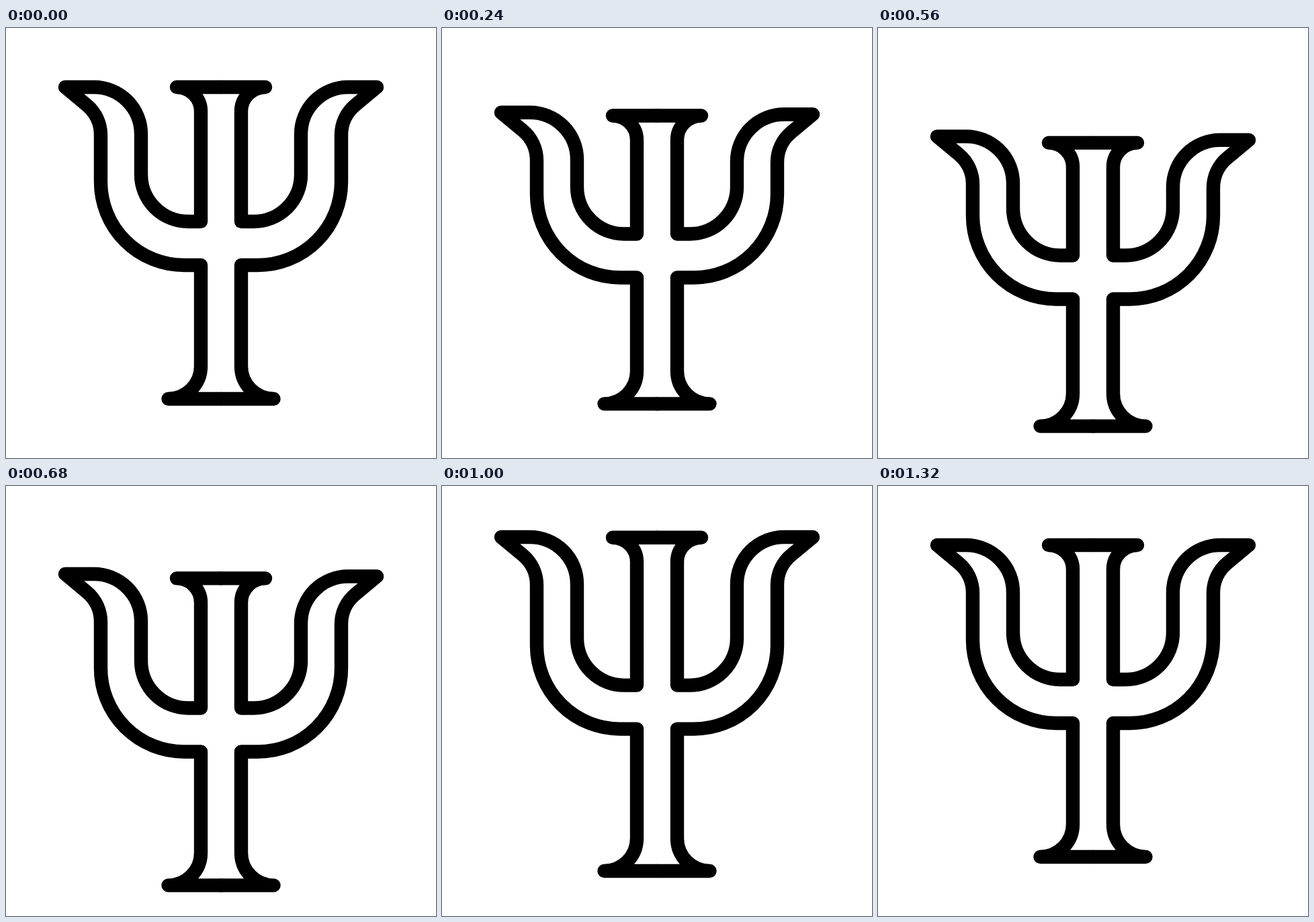
Recreate the animation shown at these times as an HTML page with a canvas. Size 640 by 640 pixels, loop 1.4 s.

```html
<!DOCTYPE html>
<html lang="en">
<head>
<meta charset="utf-8">
<title>Bouncing psi</title>
<style>
  html, body { margin: 0; width: 100%; height: 100%; overflow: hidden; background: #fff; }
  canvas { display: block; width: 640px; height: 640px; }
</style>
</head>
<body>
<canvas id="stage" width="640" height="640"></canvas>
<script>
const ctx = document.getElementById('stage').getContext('2d');
const LOOP = 1400, STEP = 40;

// Ease-in-out, cubic-bezier(.42, 0, .58, 1), between two times.
function ease(t, from, to) {
  const x = Math.min(1, Math.max(0, (t - from) / (to - from)));
  let u = x;
  for (let i = 0; i < 5; i++) {
    const error = ((0.52 * u - 0.78) * u + 1.26) * u - x;
    u -= error / ((1.56 * u - 1.56) * u + 1.26);
  }
  return u * u * (3 - 2 * u);
}

// Tips drop, spring past their rest height and settle.
function tipOffset(t, drop, lift) {
  return drop * ease(t, 77, 430)
    - (drop + lift) * ease(t, 412, 985)
    + lift * ease(t, 985, 1303);
}

const crossOffset = t => 53 * (ease(t, 71, 483) - ease(t, 440, 1217));
const baseOffset = t => 42.4 * (ease(t, 77, 642) - ease(t, 699, 1298));

// Left half of the outline, from the top bar round to the base.
function drawHalf(tip, top, cross, base) {
  ctx.beginPath();
  ctx.moveTo(320, 88 + top);
  ctx.lineTo(254, 88 + top);
  ctx.arcTo(290, 88 + top, 290, 124 + top, 36);
  ctx.lineTo(290, 288 + cross);
  ctx.arcTo(201, 288 + cross, 201, 218 + cross, 70);
  ctx.arcTo(201, 88 + tip, 131, 88 + tip, 70);
  ctx.lineTo(88, 88 + tip);
  ctx.arcTo(141, 132 + tip, 141, 159 + tip, 58);
  ctx.arcTo(141, 353 + cross, 265, 353 + cross, 124);
  ctx.lineTo(290, 353 + cross);
  ctx.arcTo(290, 552 + base, 241.5, 552 + base, 48.5);
  ctx.lineTo(241.5, 552 + base);
  ctx.lineTo(320, 552 + base);
  ctx.stroke();
}

function draw(t) {
  const top = tipOffset(t, 98, 11.3);
  const cross = crossOffset(t);
  const base = baseOffset(t);

  ctx.fillStyle = '#fff';
  ctx.fillRect(0, 0, 640, 640);
  ctx.strokeStyle = '#000';
  ctx.lineWidth = 20.4;
  ctx.lineCap = ctx.lineJoin = 'round';

  drawHalf(tipOffset(t, 87, 12), top, cross, base);
  ctx.save();
  ctx.translate(640, 0);
  ctx.scale(-1, 1);
  drawHalf(tipOffset(t, 93.3, 12), top, cross, base);
  ctx.restore();
}

let start;
function tick(now) {
  start ??= now;
  const t = (now - start) % LOOP;
  draw(Math.floor(t / STEP) * STEP);
  requestAnimationFrame(tick);
}
draw(0);
requestAnimationFrame(tick);
</script>
</body>
</html>
```
